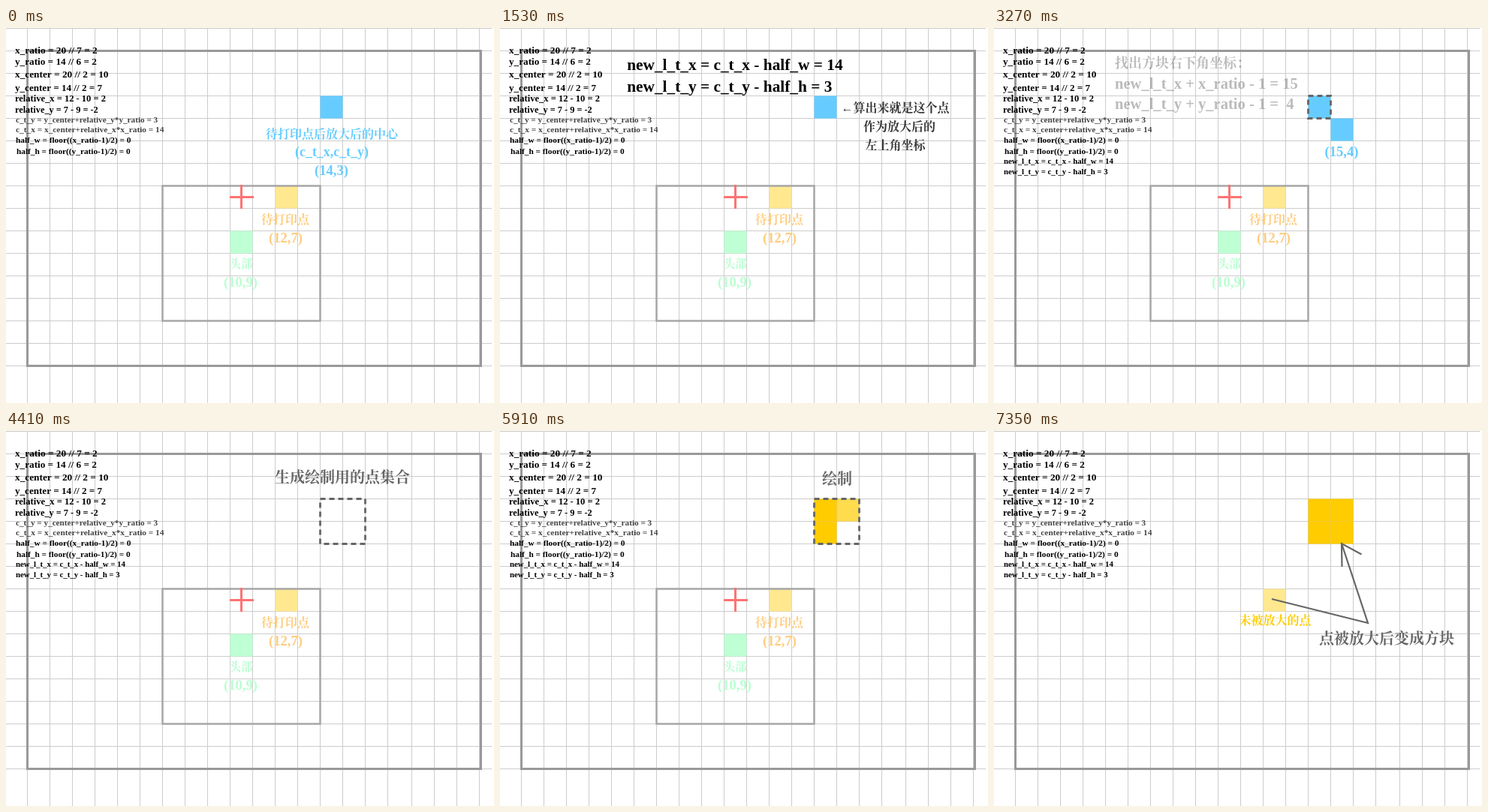
An HTML page with a canvas for the animation above (9 s loop, 650 px wide and 500 px high).

```html
<!DOCTYPE html>
<html lang="zh-CN">
<head>
<meta charset="utf-8">
<style>
html, body { margin: 0; width: 650px; height: 500px; overflow: hidden; background: #fff; }
canvas { display: block; }
</style>
</head>
<body>
<canvas id="stage" width="650" height="500"></canvas>
<script>
const ctx = document.getElementById('stage').getContext('2d');
const FONT = '"Liberation Serif", "Noto Serif CJK SC", "Noto Sans CJK SC", serif';
const LOOP = 9000, STEP = 30, CELL = 30;
const BLUE = '#66ccff', GOLD = '#ffcc00', GREY = '#666', DARK = '#333';
let now = 0;

// Progress of the current time from a to b, limited to 0..1
const ramp = (a, b) => Math.min(1, Math.max(0, (now - a) / (b - a)));
const smooth = p => p * p * (3 - 2 * p);
const mix = (a, b, p) => a + (b - a) * p;

function fade(alpha, draw) {
  if (alpha <= 0) return;
  ctx.save();
  ctx.globalAlpha = alpha;
  draw();
  ctx.restore();
}

function text(str, x, y, size, color = '#000', align = 'left') {
  ctx.font = `bold ${size}px ${FONT}`;
  ctx.fillStyle = color;
  ctx.textAlign = align;
  ctx.fillText(str, x, y);
}
const label = (str, x, y, size, color) => text(str, x, y, size, color, 'center');

function cell(x, y, color) {
  ctx.fillStyle = color;
  ctx.fillRect(x + 0.5, y + 0.5, CELL, CELL);
}

function line(points, color, width) {
  ctx.strokeStyle = color;
  ctx.lineWidth = width;
  ctx.beginPath();
  points.forEach(([x, y]) => ctx.lineTo(x, y));
  ctx.stroke();
}

function box(x, y, w, h, color, width) {
  ctx.strokeStyle = color;
  ctx.lineWidth = width;
  ctx.strokeRect(x, y, w, h);
}

const notes = [
  ['x_ratio = 20 // 7 = 2', 12, 33.5, 13.3],
  ['y_ratio = 14 // 6 = 2', 12, 49, 13.2],
  ['x_center = 20 // 2 = 10', 12, 65.5, 13.3],
  ['y_center = 14 // 2 = 7', 12, 83.5, 13.1],
  ['relative_x = 12 - 10 = 2', 12, 98, 12.5],
  ['relative_y = 7 - 9 = -2', 12, 112.5, 12.3],
  ['c_t_y = y_center+relative_y*y_ratio = 3', 13, 126, 11.2, '#444'],
  ['c_t_x = x_center+relative_x*x_ratio = 14', 13, 138.5, 11.35, '#444'],
  ['half_w = floor((x_ratio-1)/2) = 0', 13, 152.5, 11.3],
  ['half_h = floor((y_ratio-1)/2) = 0', 14, 167.5, 11.3]
];

function grid() {
  ctx.fillStyle = '#ccc';
  for (let i = 0; i <= 20; i++) ctx.fillRect(28 + CELL * i + (i > 16 ? 2 : 0), 0, 1, 500);
  for (let y = 0; y <= 450; y += CELL) ctx.fillRect(0, y, 647, 1);
}

function targetPoint() {
  label('待打印点后放大后的中心', 434, 146.5, 16, BLUE);
  label('(c_t_x,c_t_y)', 434, 171, 17.9, BLUE);
  label('(14,3)', 433.5, 196, 18.6, BLUE);
}

function cornerHint() {
  text('←算出来就是这个点', 454.5, 112, 16, DARK);
  label('作为放大后的', 532, 137, 16, DARK);
  label('左上角坐标', 526.5, 162, 16, DARK);
}

function cornerSum() {
  text('找出方块右下角坐标：', 161, 52.5, 18, DARK);
  text('new_l_t_x + x_ratio - 1 = 15', 161, 80.5, 20.55, DARK);
  text('new_l_t_y + y_ratio - 1 =  4', 161, 108, 20.55, DARK);
}

function headScene() {
  cell(298, 270, '#bfffd4');
  box(208.5, 210.5, 210, 180, '#a6a6a6', 2.5);
  line([[298, 225.5], [330, 225.5]], '#ff7373', 3);
  line([[313.5, 209], [313.5, 241]], '#ff7373', 3);
  label('头部', 313, 319.5, 15.5, '#b8ffd0');
  label('(10,9)', 312.5, 344.5, 18.6, '#b8ffd0');
  label('待打印点', 372, 260.5, 16, '#ffcc80');
  label('(12,7)', 372.5, 285.5, 18.6, '#ffcc80');
}

function arrow() {
  line([[370, 224], [498, 256], [463, 150]], GREY, 2.2);
  line([[463.5, 181], [463, 150], [489.5, 164.5]], GREY, 2.2);
  text('点被放大后变成方块', 433, 283.5, 20, GREY);
}

// Result lines appear large, then shrink into the list of notes
function movingNotes() {
  const p = smooth(ramp(1500, 1980));
  fade(ramp(240, 750), () => {
    text('new_l_t_x = c_t_x - half_w = 14', mix(171, 13, p), mix(55, 181, p), mix(21.45, 10.84, p));
    text('new_l_t_y = c_t_y - half_h = 3', mix(171, 13, p), mix(84, 195, p), mix(21.45, 10.84, p));
  });
}

function draw() {
  ctx.fillStyle = '#fff';
  ctx.fillRect(0, 0, 650, 500);
  grid();
  box(28.5, 30.5, 604, 420, '#999', 3);
  notes.forEach(n => text(...n));

  const clear = 1 - ramp(6120, 6840);
  const blueOut = 1 - ramp(4020, 4410);
  cell(358, 210, '#ffe88f');
  fade(clear, headScene);
  fade(ramp(6390, 6840), () => label('未被放大的点', 374.5, 257.5, 16, GOLD));

  fade(blueOut, () => cell(418, 90, BLUE));
  fade(ramp(2430, 2670) * blueOut, () => {
    cell(448, 120, BLUE);
    label('(15,4)', 463, 170.5, 18.6, BLUE);
  });
  fade(1 - ramp(240, 750), targetPoint);
  fade(ramp(240, 750) * (1 - smooth(ramp(1500, 1980))), cornerHint);
  movingNotes();
  fade(ramp(1950, 2430) * (1 - ramp(3090, 3360)), cornerSum);

  // Gold cells fill column by column
  [[418, 90], [418, 120], [448, 90], [448, 120]].forEach(([x, y], i) => {
    const start = 5560 + i * 130;
    fade(ramp(start, start + 130), () => cell(x, y, GOLD));
  });

  fade(ramp(1950, 2430) * clear, () => {
    const side = mix(CELL, 2 * CELL, smooth(ramp(3570, 4080)));
    ctx.setLineDash([7, 5]);
    box(418.5, 90.5, side, side, GREY, 2.8);
  });
  fade(ramp(3570, 4020) * (1 - ramp(4920, 5250)), () => text('生成绘制用的点集合', 358, 69, 20, GREY));
  fade(ramp(5250, 5580) * clear, () => label('绘制', 449, 71, 20, GREY));
  fade(ramp(7110, 7350), arrow);
}

const began = performance.now();
function tick() {
  now = Math.floor((performance.now() - began) % LOOP / STEP) * STEP;
  draw();
  requestAnimationFrame(tick);
}
tick();
</script>
</body>
</html>
```
